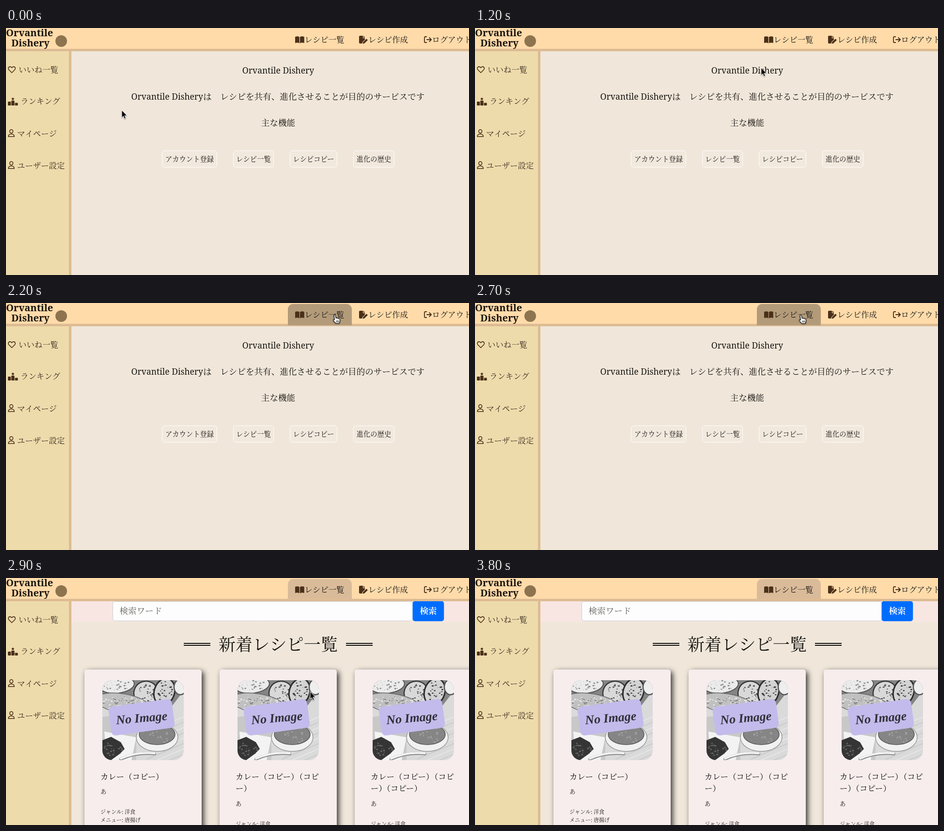
Animation of 956 by 510 pixels, one loop 3.9 s. Source, as an HTML page with a canvas:

```html
<!DOCTYPE html>
<html lang="ja">
<head>
<meta charset="utf-8">
<title>Orvantile Dishery</title>
<style>
html, body { margin: 0; width: 956px; height: 510px; overflow: hidden; background: #f0e7da; }
canvas { display: block; }
</style>
</head>
<body>
<canvas id="stage" width="956" height="510"></canvas>
<script>
const ctx = document.getElementById('stage').getContext('2d');
const LOOP = 3900, STEP = 100, PAGE_CHANGE = 2800, CURSOR_GONE = 3100;
const SERIF = '"Noto Serif", "Noto Serif CJK JP", "Noto Sans CJK JP", "Noto Sans CJK", serif';
const BRAND = ['Orvantile', 'Dishery'];
const INK = '#171411', BROWN = '#4a3019', EDGE = '#ddbb93', TAB_X = 582, TAB_W = 132;

// Pointer hot spot: time, x, y
const PATH = [
  [0, 239, 170], [700, 379, 198], [1500, 689, 29], [1600, 688, 24],
  [2700, 674, 25], [2800, 654, 104], [2900, 628, 235], [3000, 600, 400], [3100, 575, 530]
];

function rect(x, y, w, h, color) {
  ctx.fillStyle = color;
  ctx.fillRect(x, y, w, h);
}

function box(x, y, w, h, radius, fill, stroke) {
  ctx.beginPath();
  ctx.roundRect(x, y, w, h, radius);
  paint(fill, stroke);
}

function paint(fill, stroke, width = 1) {
  if (fill) { ctx.fillStyle = fill; ctx.fill(); }
  if (stroke) { ctx.strokeStyle = stroke; ctx.lineWidth = width; ctx.stroke(); }
}

function shape(d, x, y, fill, stroke, width) {
  ctx.save();
  ctx.translate(x, y);
  const path = new Path2D(d);
  if (fill) { ctx.fillStyle = fill; ctx.fill(path); }
  if (stroke) {
    ctx.strokeStyle = stroke;
    ctx.lineWidth = width;
    ctx.lineJoin = ctx.lineCap = 'round';
    ctx.stroke(path);
  }
  ctx.restore();
}

function oval(x, y, rx, ry, angle, fill, stroke, width) {
  ctx.beginPath();
  ctx.ellipse(x, y, rx, ry, angle, 0, Math.PI * 2);
  paint(fill, stroke, width);
}

// y is the vertical middle of the glyphs
function text(str, x, y, size, color = INK, align = 'left', weight = 500) {
  ctx.font = `${weight} ${size}px ${SERIF}`;
  ctx.textAlign = align;
  ctx.fillStyle = color;
  ctx.fillText(str, x, y + size * 0.38);
}

function drawUserIcon(x, y) {
  oval(x + 7, y + 4.3, 3.4, 3.6, 0, null, BROWN, 1.6);
  shape('M.9 15.2C.9 11.7 3.3 10 7 10S13.1 11.7 13.1 15.2Z', x, y, null, BROWN, 1.6);
}

function drawSidebar() {
  rect(0, 48, 130, 462, '#eedbab');
  rect(130, 48, 5, 462, EDGE);
  const label = '#35291f';
  shape('M8 13.2 1.9 7.2C-.6 4.1 1.4.9 4.4.9 6.2.9 7.3 2 8 3.1 8.7 2 9.8.9 11.6.9 14.6.9 16.6 4.1 14.1 7.2Z',
    4, 79, null, BROWN, 1.6);
  text('いいね一覧', 26, 86, 16.4, label);

  box(4, 152, 6, 8, 1, BROWN);
  box(11, 150, 6.5, 10, 1, BROWN);
  box(18.5, 154.5, 6, 5.5, 1, BROWN);
  shape('M3.2 0 4.2 2.1 6.4 2.4 4.8 4 5.2 6.3 3.2 5.2 1.2 6.3 1.6 4 0 2.4 2.2 2.1Z', 11, 143, BROWN);
  text('ランキング', 30, 151, 16.4, label);

  drawUserIcon(4, 209);
  text('マイページ', 23, 217.5, 16.4, label);
  drawUserIcon(4, 275);
  text('ユーザー設定', 23, 283.5, 16.4, label);
}

function drawHeader(tabColor, tabHeight) {
  rect(0, 0, 956, 43, '#ffdbaa');
  rect(0, 43, 956, 5, EDGE);
  if (tabColor) box(TAB_X, 2, TAB_W, tabHeight, [11, 11, 0, 0], tabColor);

  text(BRAND[0], 0, 9, 20, '#19130c', 'left', 700);
  text(BRAND[1], 11, 30.5, 20, '#19130c', 'left', 700);
  oval(114, 27, 12, 12, 0, '#8d744f');

  shape('M0 1.2C3-.2 6.3-.2 8.8 1.4V14.4C6 12.9 3 12.9 0 14ZM10 1.4C12.5-.2 15.8-.2 18.8 1.2V14C15.8 12.9 12.8 12.9 10 14.4Z',
    597, 17, BROWN);
  text('レシピ一覧', 616.5, 23.5, 16.4);

  shape('M2 0H8V5H12V8L7 13 6.3 16H2Q0 16 0 14V2Q0 0 2 0ZM9 0 12.4 4H9Z', 729, 16, BROWN);
  shape('M8.2 13.2 15.2 6.2 18 9 11 15.8 7.6 16.5Z', 729, 16, BROWN);
  text('レシピ作成', 748, 23.5, 16.4);

  shape('M5.3 1H3Q1 1 1 3V11Q1 13 3 13H5.3M6 7H15M11.2 3 15.2 7 11.2 11', 863, 17, null, BROWN, 1.8);
  text('ログアウト', 879.5, 23.5, 16.4);
}

function drawIntro() {
  text(BRAND.join(' '), 562, 87.5, 17.5, INK, 'center', 400);
  text(BRAND.join(' '), 407, 141.5, 17.5, INK, 'right', 400);
  text('は　レシピを共有、進化させることが目的のサービスです', 407, 141.5, 17.6);
  text('主な機能', 562, 195.5, 17.6, INK, 'center');
  const buttons = [[322, 114, 'アカウント登録'], [469, 84, 'レシピ一覧'], [586, 98, 'レシピコピー'], [717, 85, '進化の歴史']];
  for (const [x, w, label] of buttons) {
    box(x + .5, 253.5, w - 1, 34, 5, '#f2e9de', '#fffdfa');
    text(label, x + w / 2, 270.5, 14.3, INK, 'center');
  }
}

function speckle(x, y, rx, ry, count, color, seed) {
  ctx.fillStyle = color;
  const random = () => (seed = seed * 16807 % 2147483647) / 2147483647;
  for (let i = 0; i < count; i++) {
    const angle = random() * 6.283, r = Math.sqrt(random()), size = 1 + random() * 3;
    ctx.fillRect(x + Math.cos(angle) * r * rx, y + Math.sin(angle) * r * ry, size, size * .7);
  }
}

function drawPhoto(x, y) {
  ctx.save();
  ctx.translate(x, y);
  ctx.beginPath();
  ctx.roundRect(0, 0, 168, 165, 20);
  ctx.clip();
  rect(0, 0, 168, 165, '#dadada');
  for (let i = 0; i < 9; i++) shape('M0 0 80-34', 92, 108 + i * 11, null, i % 2 ? '#c6c6c6' : '#eaeaea', 1.5);
  shape('M0 0H168V22L140 58 100 52 40 28 0 34Z', 0, 0, '#858585');

  oval(30, 10, 36, 17, -.1, '#ebebeb', '#555', 2);
  speckle(30, 10, 28, 11, 26, '#888', 17);
  oval(90, 27, 25, 25, .3, '#d9d9d9', '#383838', 2.5);
  speckle(90, 27, 19, 19, 32, '#555', 41);
  oval(128, 24, 21, 28, .3, '#d3d3d3', '#2c2c2c', 3);
  speckle(128, 24, 15, 22, 32, '#3a3a3a', 73);
  oval(161, 14, 13, 16, 0, '#eee', '#555', 2.5);

  oval(42, 48, 56, 20, .16, '#c0c0c0', '#666', 1.5);
  speckle(42, 48, 48, 15, 70, '#ececec', 97);
  speckle(42, 48, 48, 15, 45, '#888', 131);
  shape('M0 76 70 66 70 165H0Z', 0, 0, '#c8c8c8');
  shape('M4 106 70 118 60 165H8Z', 0, 0, '#f3f3f3');

  oval(113, 118, 43, 29, 0, '#f1f1f1', '#999', 1.5);
  oval(113, 112, 37, 21, 0, '#858585', '#555', 1.5);
  speckle(113, 112, 32, 17, 35, '#a4a4a4', 151);

  shape('M0 124 18 117 38 128 46 142 36 152 18 165H0Z', 0, 0, '#353535');
  speckle(20, 140, 20, 18, 28, '#6c6c6c', 193);
  shape('M38 163Q70 148 108 152', 0, 0, null, '#8a8a8a', 6);
  shape('M38 162Q70 147 108 151', 0, 0, null, '#f4f4f4', 4);

  ctx.translate(81, 76.5);
  ctx.rotate(-.135);
  box(-66, -30, 132, 60, 9, '#c3bbeb');
  ctx.rotate(.05);
  ctx.font = 'italic 700 26px "Liberation Serif", serif';
  ctx.textAlign = 'center';
  ctx.fillStyle = '#303039';
  ctx.fillText('No Image', 0, 10);
  ctx.restore();
}

function drawCard(x, copies) {
  ctx.save();
  ctx.shadowColor = 'rgba(0,0,0,.8)';
  ctx.shadowBlur = 12;
  ctx.shadowOffsetX = ctx.shadowOffsetY = 4;
  box(x, 189, 242, 360, 5, '#f7eded');
  ctx.restore();
  drawPhoto(x + 37, 211);

  const left = x + 33, em = 16.4, black = '#090909';
  text('カレー', left, 409.5, em, black);
  text('（コピー）', left + 3 * em, 409.5, em, black);
  // Adjacent brackets share one em
  if (copies > 1) {
    text('（コピ', left + 7.5 * em, 409.5, em, black);
    text('ー）', left, 434, em, black);
  }
  if (copies > 2) text('（コピー）', left + 1.5 * em, 434, em, black);

  const y = copies > 1 ? 466.5 : 441.5;
  text('あ', left, y, 12.3);
  text('ジャンル: 洋食', left, y + 41.5, 11);
  text('メニュー: 唐揚げ', left, y + 58.5, 11);
}

function drawList() {
  rect(135, 48, 821, 43, '#f8e6e2');
  box(220.5, 48.5, 620, 40, 5, '#fdfdfd', '#c9ced4');
  text('検索ワード', 234.5, 67.5, 17.6, '#5f5c5a');
  box(839.5, 47.7, 64.8, 41.5, 5, '#006dff');
  text('検索', 872, 67.5, 17.6, '#fff', 'center', 600);

  text('新着レシピ一覧', 562, 137, 35.2, INK, 'center');
  for (const x of [367, 702]) {
    rect(x, 134, 55, 2, '#111');
    rect(x, 138, 55, 2, '#111');
  }
  [162, 441, 720].forEach((x, i) => drawCard(x, i + 1));
}

function pointerAt(t) {
  const next = PATH.findIndex(key => key[0] > t);
  const [t0, x0, y0] = PATH[next - 1], [t1, x1, y1] = PATH[next];
  const u = (t - t0) / (t1 - t0), ease = u * u * (3 - 2 * u);
  return [x0 + (x1 - x0) * ease, y0 + (y1 - y0) * ease];
}

function drawPointer(x, y, kind) {
  if (kind === 'beam') {
    const beam = 'M-3-8Q0-8 0-6Q0-8 3-8M0-6V6M-3 8Q0 8 0 6Q0 8 3 8M-1.5 2H1.5';
    shape(beam, x + .5, y, null, '#fff', 2.6);
    shape(beam, x + .5, y, null, '#111', 1.2);
    return;
  }
  ctx.save();
  ctx.shadowColor = 'rgba(0,0,0,.35)';
  ctx.shadowBlur = 2;
  ctx.shadowOffsetY = 1;
  if (kind === 'hand') {
    shape('M-1.6 10 -3 1.6C-3.4-.6-.3-1 .2 1.2L1.3 6.5C2 5.4 3.6 5.6 4 7 5 6 6.4 6.4 6.8 7.8 8.2 7 9.4 8 9.5 9.6L9.6 13 8 17.5H1L-4 12C-5.4 10-3.4 8.6-1.6 10Z',
      x, y, '#fff', '#111', 1.1);
    shape('M2.4 11.5V15M4.6 11.5V15M6.8 11.5V15', x, y, null, '#111', .8);
  } else {
    shape('M0 0V15L3.4 11.9 5.8 17.4 8.4 16.2 6 10.9H10.7Z', x, y, '#000', '#fff', 1);
  }
  ctx.restore();
}

function draw(t) {
  const listShown = t >= PAGE_CHANGE;
  const pointer = t < CURSOR_GONE ? pointerAt(t) : null;
  const hover = pointer && pointer[1] < 46 && pointer[0] >= TAB_X && pointer[0] < TAB_X + TAB_W;

  rect(0, 0, 956, 510, '#f0e7da');
  if (listShown) drawList(); else drawIntro();
  drawSidebar();
  drawHeader(hover ? '#b39b7a' : listShown ? '#dabb99' : null, hover ? 44 : 41);
  if (pointer) {
    const kind = hover ? 'hand' : listShown && pointer[1] < 160 ? 'beam' : 'arrow';
    drawPointer(...pointer, kind);
  }
}

const start = performance.now();
function tick() {
  const elapsed = (performance.now() - start) % LOOP;
  draw(Math.floor(elapsed / STEP) * STEP);
  requestAnimationFrame(tick);
}
tick();
</script>
</body>
</html>
```
